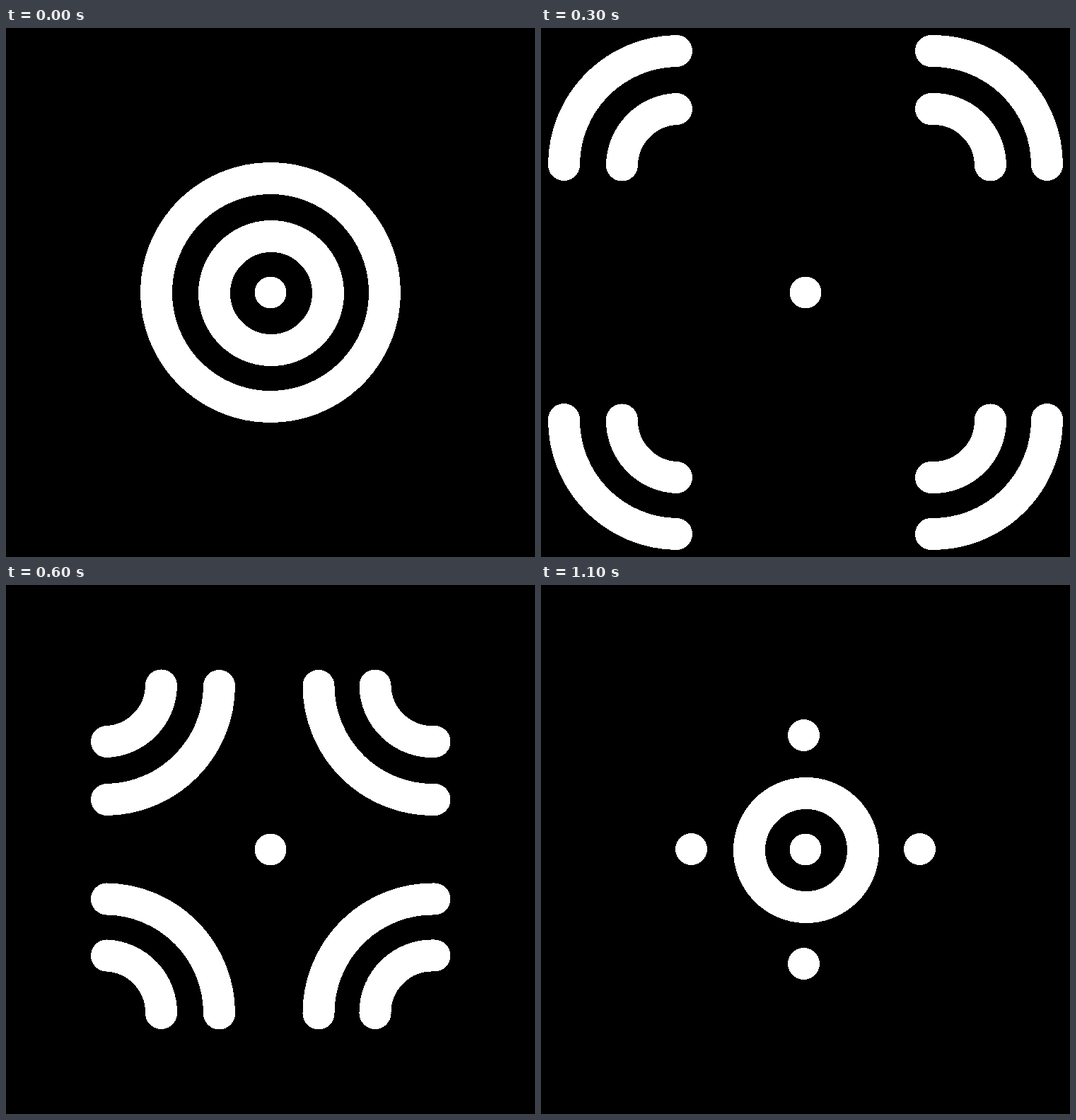
These frames come from a looping animation (748x748 px, 1200 ms). An HTML page:

```html
<!DOCTYPE html>
<html lang="en">
<head>
<meta charset="utf-8">
<title>Rings</title>
<style>
  html, body { margin: 0; width: 100%; height: 100%; overflow: hidden; background: #000; }
  svg { display: block; width: 748px; height: 748px; }
  path { fill: none; stroke: #fff; stroke-width: 45; stroke-linecap: round; }
</style>
</head>
<body>
<svg viewBox="0 0 748 748" shape-rendering="crispEdges">
  <circle cx="374" cy="374" r="22.5" fill="#fff"/>
</svg>
<script>
const STEP = 100, STEPS = 12, SPEED = 60;
const svg = document.querySelector('svg');

// Junctions of each ring, clockwise from the left
const rings = [
  { r: 161.5, pts: [[212.5, 373.5], [371.5, 212.5], [535.5, 373.5], [371.5, 535.5]] },
  { r: 80.75, pts: [[294.5, 374], [371.5, 294.5], [455.5, 374], [371.5, 455.5]] }
];

// Outward direction and turning centre of each quarter, clockwise from top left
const quarters = [
  { dx: -1, dy: -1, pivot: [287, 288] },
  { dx: 1, dy: -1, pivot: [458.75, 288] },
  { dx: 1, dy: 1, pivot: [458.75, 459.75] },
  { dx: -1, dy: 1, pivot: [287, 459.75] }
];

function add(name, parent) {
  return parent.appendChild(document.createElementNS('http://www.w3.org/2000/svg', name));
}

quarters.forEach((q, i) => {
  q.group = add('g', svg);
  q.arcs = rings.map(({ r, pts }) => {
    const arc = add('path', q.group);
    arc.setAttribute('d', `M${pts[i]}A${r} ${r} 0 0 1 ${pts[(i + 1) % 4]}`);
    arc.setAttribute('pathLength', 1);
    return arc;
  });
});

// Arc length: 1 is whole, 0 is a dot, below 0 is hidden
function lengths(step) {
  if (step < 8) return [1, 1];
  return [[0, 0], [-1, -1], [-1, 0], [0, 1]][step - 8];
}

function draw() {
  const step = Math.floor(performance.now() / STEP) % STEPS;
  const turned = step > 3 && step < 9;
  const shift = SPEED * (step < 4 ? step : Math.max(0, 7 - step));
  const len = lengths(step);
  for (const { dx, dy, pivot, group, arcs } of quarters) {
    const turn = turned ? ` rotate(180 ${pivot})` : '';
    group.setAttribute('transform', `translate(${dx * shift} ${dy * shift})${turn}`);
    arcs.forEach((arc, i) => {
      arc.style.display = len[i] < 0 ? 'none' : '';
      arc.style.strokeDasharray = len[i] === 1 ? 'none' : '0 2';
    });
  }
  requestAnimationFrame(draw);
}
draw();
</script>
</body>
</html>
```
